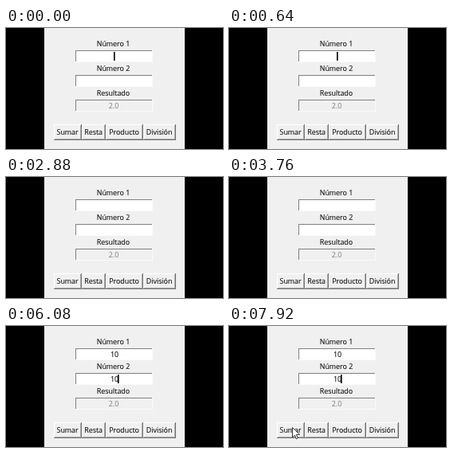
These frames come from a looping animation (272x152 px, 8 s). An HTML page:

```html
<!DOCTYPE html>
<html lang="es">
<head>
<meta charset="utf-8">
<title>Calculadora</title>
<style>
  html, body { margin: 0; width: 100%; height: 100%; overflow: hidden; background: #000; }
  svg { display: block; width: 272px; height: 152px; }
  text {
    font: 8.9px "Open Sans", "Noto Sans", sans-serif;
    text-anchor: middle; fill: #111; stroke: #111; stroke-width: .12px;
  }
  .off { fill: #7c7c7c; stroke: none; }
</style>
</head>
<body>
<svg id="stage" viewBox="0 0 272 152"></svg>
<script>
const LOOP = 8000, TICK = 80;
const ROW = 31;                          // distance between entries
const BLINK = 910, BLINK_ON = 595;
const stage = document.getElementById("stage");

function add(tag, attrs, text) {
  const el = document.createElementNS("http://www.w3.org/2000/svg", tag);
  for (const key in attrs) el.setAttribute(key, attrs[key]);
  if (text) el.textContent = text;
  return stage.appendChild(el);
}
const rect = (x, y, width, height, fill) => add("rect", { x, y, width, height, fill });
const label = (x, y, text, cls = "") => add("text", { x, y, class: cls }, text);

function entry(y, fill) {
  rect(87, y, 97, 15, "#fafafa");
  rect(87, y, 96, 14, "#808080");
  rect(88, y + 1, 95, 13, fill);
}

function button(x, width, text) {
  rect(x, 121, width, 20, "#747474");
  rect(x, 121, width - 1, 19, "#fff");
  rect(x + 1, 122, width - 2, 18, "#a8a8a8");
  rect(x + 1, 122, width - 3, 17, "#f0f0f0");
  label(x + width / 2 - 0.4, 134.3, text);
}

rect(48, 0, 176, 152, "#f0f0f0");
["Número 1", "Número 2", "Resultado"].forEach((name, i) => {
  label(134.5, 23 + ROW * i, name);
  entry(28 + ROW * i, i < 2 ? "#fff" : "#f0f0f0");
});
label(135, 101, "2.0", "off");

button(60, 35, "Sumar");
button(95, 30, "Resta");
button(125, 47, "Producto");
button(172, 41, "División");

const fields = [
  { focus: -510, typeAt: 4640, gap: 80 },
  { focus: 5138, typeAt: 5760, gap: 160 }
];
fields.forEach((field, i) => { field.el = label(136, 39 + ROW * i, ""); });

const caret = rect(135, 30, 1.6, 11, "#000");
const pointer = add("path", {
  d: "M.5 .5V13L3.4 10.1L5.4 14.7L7.4 13.8L5.4 9.4H9.6Z",
  fill: "#fff", stroke: "#222", "stroke-width": 0.9, "stroke-linejoin": "round"
});

// The pointer travels along the path, then rests until it hides.
const trips = [
  { start: 160, travel: 400, hide: 640, path: [[140, 2], [72, 112], [186, 119]] },
  { start: 1920, travel: 160, hide: 2320, path: [[186, 120], [104, 50], [143, 0]] },
  { start: 7520, travel: 240, hide: LOOP, path: [[95, 146], [74, 130], [79, 127]] }
];

function along(path, p) {
  const u = Math.min(p, 1) * (path.length - 1);
  const i = Math.min(Math.floor(u), path.length - 2);
  return path[i].map((v, k) => v + (path[i + 1][k] - v) * (u - i));
}

function draw(now) {
  const t = Math.floor(now % LOOP / TICK) * TICK;

  for (const { el, typeAt, gap } of fields) {
    el.textContent = "10".slice(0, Math.max(0, Math.floor((t - typeAt) / gap) + 1));
  }

  const row = t < fields[1].focus ? 0 : 1;
  const { el, focus } = fields[row];
  caret.setAttribute("x", 135 + 2.5 * el.textContent.length);
  caret.setAttribute("y", 30 + ROW * row);
  caret.setAttribute("opacity", (t - focus) % BLINK < BLINK_ON ? 1 : 0);

  const trip = trips.find(({ start, hide }) => t >= start && t < hide);
  pointer.setAttribute("visibility", trip ? "visible" : "hidden");
  if (trip) {
    const pos = along(trip.path, (t - trip.start) / trip.travel);
    pointer.setAttribute("transform", `translate(${pos})`);
  }
}

const begin = performance.now();
function tick() {
  draw(performance.now() - begin);
  requestAnimationFrame(tick);
}
tick();
</script>
</body>
</html>
```
